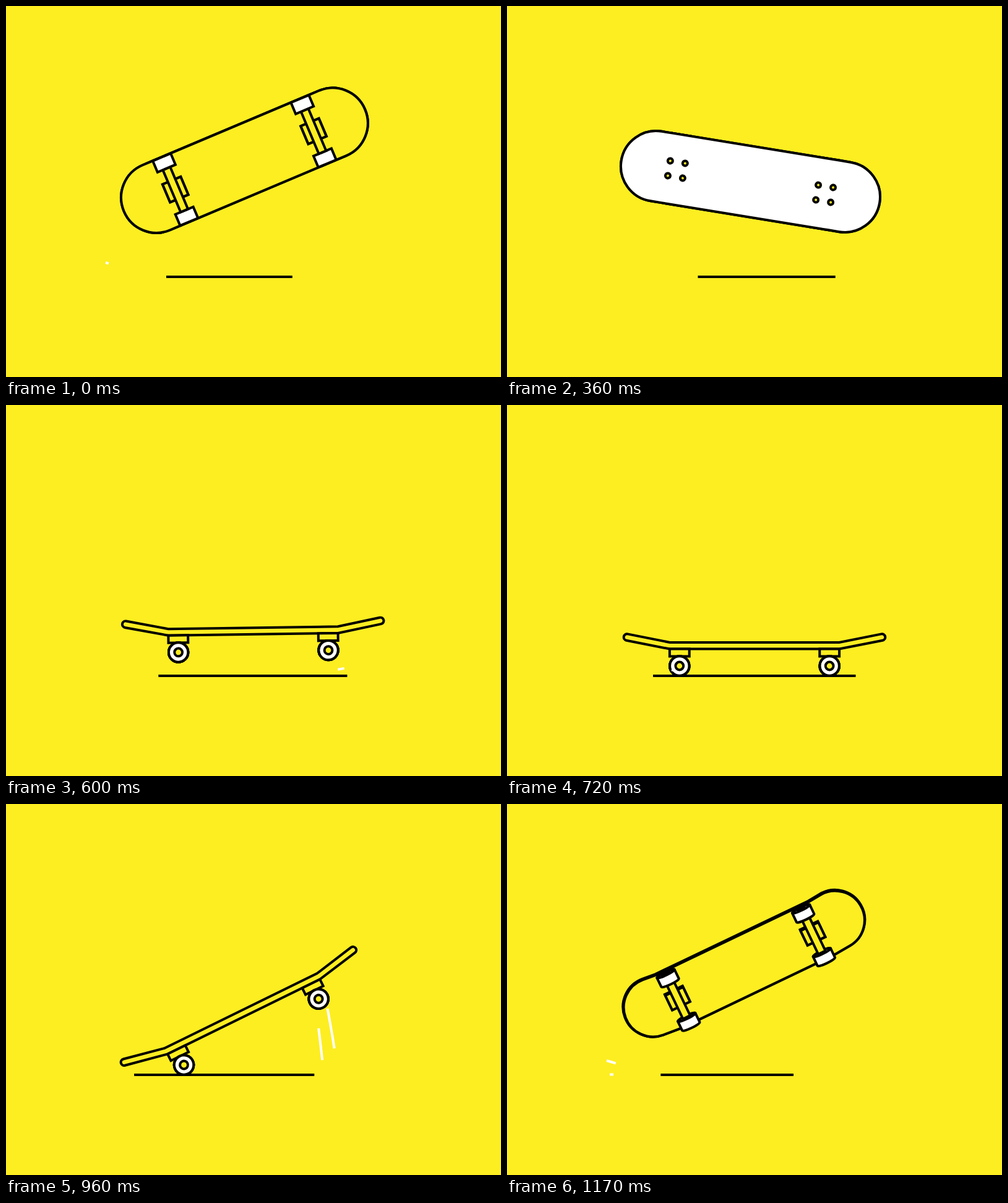
Animation, 800 px wide and 600 px high, one loop 1200 ms. Source, as an HTML page:

```html
<!DOCTYPE html>
<html lang="en">
<head>
<meta charset="utf-8">
<title>Kickflip</title>
<style>
  html, body { margin: 0; width: 100%; height: 100%; overflow: hidden; background: #fdee21; }
  svg { display: block; width: 100%; height: 100%; }
</style>
</head>
<body>
<svg viewBox="0 0 800 600" fill="none" stroke="#000" stroke-width="4">
  <path id="ground"/>
  <g id="board"></g>
  <path id="lines" stroke="#fff"/>
</svg>
<script>
const LOOP = 1200, STEP = 30;
const YELLOW = '#fdee21', WHITE = '#fff';

// Phases of the jump; the loop point lies in mid-air
const POP = -355, LIFT = -190, PEAK = 146, LAND = 470, REST = 710;
const QUARTER = 180;                 // time of a quarter roll

// Board dimensions, measured from the middle of the deck
const HALF_THICK = 5.3, HALF_WIDTH = 57, KINK = 137, KICK = 13.7;
const TRUCK = 121.2, PLATE = 15.9, AXLE_Y = 32.75;
const WHEEL = 15.7, HUB = 6.4, WHEEL_IN = 37, WHEEL_OUT = 56.8;
const REST_Y = 389.25, PEAK_Y = 218.4, MAX_TILT = 9.3, POP_TILT = -33.5;

const clamp = (v, lo = 0, hi = 1) => Math.min(hi, Math.max(lo, v));
const mod = (a, n) => ((a % n) + n) % n;
const mix = (a, b, u) => a + (b - a) * u;
const part = (t, from, to) => clamp((t - from) / (to - from));
const smooth = u => u * u * (3 - 2 * u);
const wave = q => Math.abs(mod(q, 4) - 2) - 1;

// Nose lifts while the rear wheel rolls a little on the ground
function pop(t) {
  const tilt = POP_TILT * smooth(part(t, POP, LIFT));
  const a = tilt * Math.PI / 180, c = Math.cos(a), s = Math.sin(a);
  return {
    x: 279 - 0.327 * tilt + TRUCK * c + AXLE_Y * s,
    y: REST_Y + AXLE_Y + TRUCK * s - AXLE_Y * c,
    tilt
  };
}

function fly(t) {
  const rise = part(t, PEAK, LIFT), fall = Math.max(0, t - PEAK);
  return {
    x: 393.5 - 20.5 * (1 - part(t, LIFT, 360)) ** 2.2,
    y: PEAK_Y + 109.1 * rise ** 1.5 + 0.001432 * fall ** 2,
    tilt: clamp(-22.9 + 0.0894 * t, POP_TILT, MAX_TILT)
  };
}

// The front wheels touch first and bounce before the board settles
function land(t) {
  const u = part(t, LAND, REST);
  return {
    x: mix(400, 393.5, (1 - u) ** 3),
    y: mix(370, REST_Y, u) - 60 * u * (1 - u),
    tilt: MAX_TILT * (1 - u) ** 2 * Math.cos(3.68 * u)
  };
}

const pose = t => t < LIFT ? pop(t) : t < LAND ? fly(t) : land(t);

const path = (d, fill) => `<path d="${d}" fill="${fill}"/>`;
const ellipse = (x, y, rx, ry, fill) =>
  `<ellipse cx="${x}" cy="${y}" rx="${rx}" ry="${ry}" fill="${fill}"/>`;
const rect = (x, y, hw, hh) =>
  path(`M${x - hw} ${y - hh}h${2 * hw}v${2 * hh}h${-2 * hw}Z`, YELLOW);

// Round-ended strip whose two ends bend by the kick
function strip(r, dy, C, fill) {
  const e = 154.5 + 51.5 * Math.abs(C), k = -KICK * C;
  const a = Math.atan2(k, e - KINK);
  const nx = r * Math.sin(a), ny = r * Math.cos(a);
  const arc = `A${r} ${r} 0 0 1 `;
  return path(
    `M${-KINK} ${dy - r}L${KINK} ${dy - r}L${e + nx} ${dy + k - ny}` +
    `${arc}${e - nx} ${dy + k + ny}L${KINK} ${dy + r}L${-KINK} ${dy + r}` +
    `L${-e + nx} ${dy + k + ny}${arc}${-e - nx} ${dy + k - ny}Z`, fill);
}

// C and S say how far the board shows its side and its flat face
function deck(C, S) {
  const top = S < 0, w = Math.abs(S);
  const dy = HALF_THICK * C * (top ? -1 : 1);
  let out = strip(HALF_THICK * Math.abs(C) + HALF_WIDTH * w, 0, C, YELLOW);
  if (w) out += strip(HALF_WIDTH * w, dy, C, top ? WHITE : YELLOW);
  if (top) {
    for (const x of [-TRUCK, TRUCK])
      for (const bx of [-12.15, 12.15])
        for (const bz of [-12.15, 12.15])
          out += ellipse(x + bx, dy - bz * S, 4, 4 * w, YELLOW);
  }
  return out;
}

function wheel(x, side, near, C, S) {
  const y = z => AXLE_Y * C - side * z * S;
  const ry = WHEEL * Math.abs(C);
  const ends = [y(WHEEL_IN), y(WHEEL_OUT)];
  const y1 = Math.min(...ends), y2 = Math.max(...ends);
  const l = x - WHEEL, r = x + WHEEL, arc = `A${WHEEL} ${ry} 0 0 1 `;
  let out = path(`M${l} ${y1}${arc}${r} ${y1}L${r} ${y2}${arc}${l} ${y2}Z`, WHITE);
  if (ry) {
    const face = ends[near ? 1 : 0];
    out += ellipse(x, face, WHEEL, ry, WHITE);
    if (near) out += ellipse(x, face, HUB, HUB * Math.abs(C), YELLOW);
  }
  return out;
}

function truck(x, C, S) {
  const c = Math.abs(C), w = Math.abs(S), nearSide = C < 0 ? -1 : 1;
  let out = wheel(x, -nearSide, false, C, S);
  out += rect(x, (HALF_THICK + 6) * C, PLATE, 6 * c + 15.7 * w);
  if (S > 0) out += rect(x, (HALF_THICK + 12) * C, PLATE, 15.7 * w);
  if (w) out += rect(x, AXLE_Y * C, HUB, WHEEL_IN * w);
  return out + wheel(x, nearSide, true, C, S);
}

// Visible piece of a slightly bent line that shoots out of a point
function streak(t, start, x, y, dx, dy) {
  const p = mod(t - start, LOOP) / 150;
  if (p <= 0 || p >= 1) return '';
  const head = clamp(p / 0.7), tail = clamp((p - 0.3) / 0.7);
  const at = (u, v) => {
    const mid = u + v - 2 * u * v, end = u * v;
    return `${x + dx * (0.3 * mid + end)} ${y + dy * (0.4 * mid + end)}`;
  };
  return `M${at(tail, tail)}Q${at(tail, head)} ${at(head, head)}`;
}

function streaks(t) {
  const rise = (start, x, y) => streak(t, start, x, y, -14, -120);
  const longRise = (start, x, y) => streak(t, start, x, y, -26, -150);
  const dust = (start, side) =>
    streak(t, start, 400 + side * 131, 429, side * 24, -4.5);
  return rise(105, 266, 302.5) + longRise(105, 295, 336) +
    rise(885, 514, 443.5) + longRise(885, 536, 432) +
    dust(523, 1) + dust(700, -1) +
    streak(t, 1063, 190, 424.5, -29, -9.5) +
    streak(t, 1040, 190, 437.5, -24, 0);
}

const [ground, board, lines] = ['ground', 'board', 'lines'].map(id => document.getElementById(id));

function draw(time) {
  const t = time >= POP + LOOP ? time - LOOP : time;
  const { x, y, tilt } = pose(t);
  const q = clamp(t / QUARTER + 1, 0, 4);
  const C = wave(q), S = wave(q - 1);
  const trucks = truck(-TRUCK, C, S) + truck(TRUCK, C, S);
  const top = deck(C, S);

  // The ground line shrinks with height and leans with the tilt
  const height = REST_Y - y;
  const mid = 399.8 + 1.85 * tilt + 0.025 * height;
  const half = (327.5 - 0.96 * height - 0.45 * tilt) / 2;

  ground.setAttribute('d', `M${mid - half} 438H${mid + half}`);
  board.setAttribute('transform', `translate(${x} ${y}) rotate(${tilt})`);
  board.innerHTML = S < 0 ? trucks + top : top + trucks;
  lines.setAttribute('d', streaks(t));
}

const begin = performance.now();
function tick() {
  const time = (performance.now() - begin) % LOOP;
  draw(Math.floor(time / STEP) * STEP);
  requestAnimationFrame(tick);
}
tick();
</script>
</body>
</html>
```
